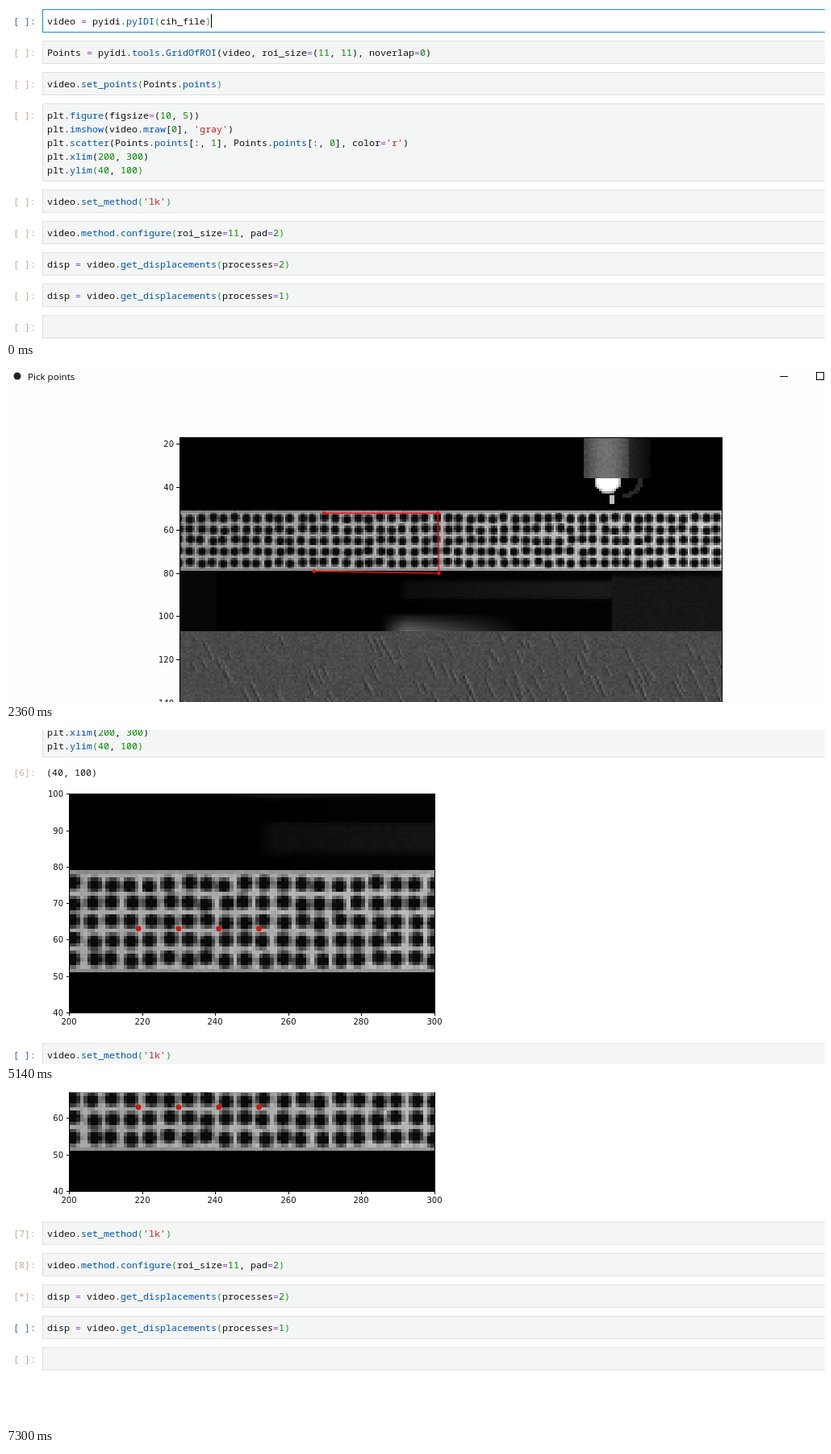
Recreate the animation shown at these times as an HTML page with a canvas. Size 1015x415 px, loop 8 s.

```html
<!DOCTYPE html>
<html lang="en">
<head>
<meta charset="utf-8">
<title>Notebook session</title>
<style>
  html, body { margin: 0; height: 100%; overflow: hidden; background: #fff; }
  canvas { display: block; }
</style>
</head>
<body>
<canvas id="stage" width="1015" height="415"></canvas>
<script>
const LOOP = 8000;
const ctx = document.getElementById('stage').getContext('2d');
const MONO = '11.667px "Noto Sans Mono", monospace';
const PLOT = '10px "DejaVu Sans", sans-serif';
const TITLE = '11.6px "Open Sans", sans-serif';
const CHAR = 7, LINE = 17;

// start: run begins and the next cell is selected; done: the number appears
const cells = [
  { code: ['video = pyidi.pyIDI(cih_file)'], start: 230, done: 230 },
  { code: ['Points = pyidi.tools.GridOfROI(video, roi_size=(11, 11), noverlap=0)'], start: 480, done: 3370 },
  { code: ['video.set_points(Points.points)'], start: 3520, done: 3600 },
  { code: ['plt.figure(figsize=(10, 5))',
           "plt.imshow(video.mraw[0], 'gray')",
           "plt.scatter(Points.points[:, 1], Points.points[:, 0], color='r')",
           'plt.xlim(200, 300)',
           'plt.ylim(40, 100)'], start: 4060, done: 4290 },
  { code: ["video.set_method('lk')"], start: 6760, done: 6760 },
  { code: ['video.method.configure(roi_size=11, pad=2)'], start: 7220, done: 7220 },
  { code: ['disp = video.get_displacements(processes=2)'], start: 7300, done: Infinity },
  { code: ['disp = video.get_displacements(processes=1)'], start: Infinity, done: Infinity },
  { code: [''], start: Infinity, done: Infinity },
];
const warning = [
  'C:\\ProgramData\\Anaconda3\\lib\\site-packages\\pyMRAW.py:103: UserWarning: Clipped footage! (Total frame: 2001, Original total frame: 50000)',
  "  warnings.warn('Clipped footage! (Total frame: {}, Original total frame: {})'.format(cih['Total Frame'], cih['Original Total Frame'] ))",
];
const picks = [[394.5, 180.5, 1490], [535, 180.5, 1890], [536.5, 255, 2210], [381.5, 252.5, 2360]];

const clamp = (v, lo = 0, hi = 1) => Math.min(hi, Math.max(lo, v));
const between = (v, lo, hi) => v >= lo && v < hi;
const easeInOut = p => p < .5 ? 4 * p ** 3 : 1 - 4 * (1 - p) ** 3;

// Eased progress that advances in visible ticks, as a screen recorder catches it.
function glide(t, start, tick, duration) {
  if (t < start) return 0;
  const elapsed = Math.floor((t - start) / tick + 1e-6) * tick + 70;
  return easeInOut(clamp(elapsed / duration));
}

function fill(color, x, y, w, h) {
  ctx.fillStyle = color;
  ctx.fillRect(x, y, w, h);
}
function text(str, x, y, color = '#111', font = MONO, align = 'left') {
  ctx.font = font;
  ctx.textAlign = align;
  ctx.fillStyle = color;
  ctx.fillText(str, x, y);
}
function dot(x, y, r, color) {
  ctx.fillStyle = color;
  ctx.beginPath();
  ctx.arc(x, y, r, 0, 7);
  ctx.fill();
}
function frame(color, x, y, w, h) {
  ctx.strokeStyle = color;
  ctx.lineWidth = 1;
  ctx.strokeRect(x + .5, y + .5, w - 1, h - 1);
}

// ---- camera picture: x 150..401, y 17..145 in sensor pixels ----
const X0 = 150, Y0 = 17, COLS = 251, ROWS = 128;
const hash = (a, b) => {
  const v = Math.sin(a * 12.9898 + b * 78.233) * 43758.5453;
  return v - Math.floor(v);
};

// Band of printed dots; neighbouring dots may nearly touch.
function speckle(x, y) {
  const col = Math.round((x - 201.5) / 5.18);
  const row = clamp(Math.round((y - 54.6) / 5.13), 0, 4);
  const dx = x - 201.5 - col * 5.18 - (hash(col, row) - .5) * 1.1;
  const dy = y - 54.6 - row * 5.13 - (hash(row + 9, col) - .5) * 1.1;
  const d = Math.hypot(dx, dy);
  const light = 146 + (x - X0) * .2 + hash(x, y) * 16;
  const edge = clamp(Math.min(y - 50.5, 79.5 - y) / 1.2);
  return (10 + (light - 10) * clamp((d - 1.3) / 1.5)) * edge;
}

function nozzle(x, y, n) {
  if (y < 36.5) {
    if (between(x, 337, 358)) return 58 + 48 * Math.sin((x - 337) / 21 * Math.PI) + n * 14;
    return between(x, 358, 368) ? 34 * (1 - (x - 358) / 12) + n * 6 : 1;
  }
  const tip = Math.hypot((x - 348) / 6.3, (y - 37.5) / 5.6);
  if (tip < 1) return 255 - 130 * clamp((tip - .75) * 4);
  if (between(y, 44, 48) && between(x, 349, 351)) return 190;
  const rim = Math.hypot((x - 354) / 9, (y - 37) / 7.5);
  return x > 355 && Math.abs(rim - 1) < .12 ? 42 : 1;
}

// Dim machinery between the band and the ground.
function shade(x, y, n) {
  if (x >= 350) return (19 + n * 6) * clamp((y - 79) / 4);
  const bar = (12 + 12 * clamp((x - 262) / 80) + n * 4)
    * clamp((x - 251) / 5) * clamp((y - 82) / 3) * clamp((93 - y) / 2);
  const glow = 115 * clamp((y - 98) / 9) * clamp((x - 243) / 12) * clamp((310 - x) / 60);
  return Math.max(bar, glow, x < 167 ? 6 : 3 * clamp((x - 256) / 30));
}

function gray(x, y) {
  const n = hash(x, y);
  if (y >= 107) return 62 + (n + hash(y, x)) * 12;
  if (y >= 79) return shade(x, y, n);
  return y >= 51 ? speckle(x, y) : nozzle(x, y, n);
}

function makePicture() {
  const canvas = document.createElement('canvas');
  canvas.width = COLS;
  canvas.height = ROWS;
  const g = canvas.getContext('2d');
  const data = g.createImageData(COLS, ROWS);
  for (let i = 0; i < COLS * ROWS; i++) {
    const v = gray(X0 + i % COLS + .5, Y0 + Math.floor(i / COLS) + .5);
    data.data.set([v, v, v, 255], i * 4);
  }
  g.putImageData(data, 0, 0);
  // slanted scratches on the ground
  for (let i = 0; i < 110; i++) {
    const x = hash(i, 1) * COLS, y = 91 + hash(i, 2) * 34, len = 3 + hash(i, 3) * 7;
    ['rgba(30,30,30,.45)', 'rgba(150,150,150,.3)'].forEach((color, side) => {
      g.strokeStyle = color;
      g.beginPath();
      g.moveTo(x + side, y);
      g.lineTo(x + side + len * .45, y + len);
      g.stroke();
    });
  }
  return canvas;
}
const picture = makePicture();

// ---- notebook ----
function drawCode(line, x, y, matchEnd) {
  const open = matchEnd ? line.lastIndexOf('(') : -1;
  for (const { 0: token, index } of line.matchAll(/'[^']*'|[A-Za-z_]\w*|\d+|\S/g)) {
    let color = '#111';
    if (token[0] === "'") color = '#ba2121';
    else if (/\d/.test(token[0])) color = '#080';
    else if (token === '=') color = '#8a3fd0';
    else if (/\w/.test(token[0]) && line[index - 1] === '.') color = '#05a';
    else if (open >= 0 && (index === open || index === line.length - 1)) color = '#1a9a1a';
    text(token, x + index * CHAR, y, color);
  }
}

function drawPlot(top) {
  const left = 78, scale = 4.53, w = 453, h = 272;
  ctx.save();
  ctx.translate(left, top + h);
  ctx.scale(1, -1);
  ctx.drawImage(picture, 200 - X0, 40 - Y0, 100, 60, 0, 0, w, h);
  ctx.restore();
  for (const x of [219, 230, 241, 252]) {
    dot(left + (x - 200) * scale, top + h - 23 * scale, 3.4, '#c81a10');
  }
  frame('#000', left, top, w + 1, h + 1);
  for (let v = 40; v <= 100; v += 10) {
    const y = Math.round(top + h - (v - 40) * scale);
    fill('#000', left - 3, y, 3, 1);
    text(v, left - 7, y + 4, '#111', PLOT, 'right');
  }
  for (let v = 200; v <= 300; v += 20) {
    const x = Math.round(left + (v - 200) * scale);
    fill('#000', x, top + h, 1, 4);
    text(v, x, top + h + 15, '#111', PLOT, 'center');
  }
}

function drawNotebook(t) {
  const active = cells.filter(c => c.start <= t).length;
  const scroll = 228 * (glide(t, 4760, 76, 450) + glide(t, 5770, 80, 600));
  let y = 4 - Math.round(scroll);
  cells.forEach(({ code, start, done }, i) => {
    const h = code.length * LINE + 12;
    const editing = i === active && (t < 230 || between(t, 6520, 6760));
    const mark = t >= done ? i + 3 : t >= start ? '*' : ' ';
    text(`[${mark}]:`, 9, y + 19, i === active ? '#38608c' : '#c0a890');
    fill(editing ? '#fff' : '#f4f5f5', 45, y, 990, h);
    frame(editing ? '#2088d8' : '#dfe0e0', 45, y, 990, h);
    code.forEach((line, k) =>
      drawCode(line, 51, y + 19 + k * LINE, i !== 1 && k === code.length - 1));
    if (editing && (t < 80 || t >= 6590)) {
      fill('#000', 51 + code[0].length * CHAR, y + 6, 1, 17);
    }
    y += h + 10;
    if (i === 0 && t >= start) {
      fill('#fddddc', 45, y - 5, 970, 39);
      warning.forEach((line, k) => text(line, 50, y + 13 + k * LINE));
      y += 44;
    }
    if (i === 3 && t >= 4140) {
      const plotted = t >= done;
      text(`[${mark}]:`, 9, y + 13, '#d0aca0');
      text('(40, 100)', 50, y + 13);
      if (plotted) drawPlot(y + 35);
      y += plotted ? 345 : 27;
    }
  });
}

// ---- point picking window ----
function drawPicker(t) {
  const rest = 1 - glide(t, 960, 77.5, 380);
  const scale = 2.68, left = 215, top = 86;
  ctx.save();
  ctx.translate(Math.round(161 * rest), Math.round(-10 * rest));
  ctx.shadowColor = 'rgba(0,0,0,.25)';
  ctx.shadowBlur = 14;
  fill('#fefefe', -3, -5, 1200, 600);
  ctx.shadowColor = 'transparent';
  fill('#777', -3, -5, 1, 600);

  dot(14, 10, 4.5, '#222');
  text('Pick points', 27, 15, '#000', TITLE);
  fill('#000', 959, 10, 10, 1);
  frame('#000', 1004, 5, 10, 10);

  ctx.drawImage(picture, left, top, COLS * scale, ROWS * scale);
  frame('#000', left, top, 673, 600);
  for (let v = 20; v <= 140; v += 20) {
    const y = Math.round(top + (v - Y0) * scale);
    fill('#000', left - 4, y, 4, 1);
    text(v, left - 7, y + 4, '#111', PLOT, 'right');
  }

  const shown = picks.filter(p => p[2] <= t);
  ctx.strokeStyle = '#f01010';
  ctx.lineWidth = 1.4;
  ctx.beginPath();
  shown.forEach(([x, y]) => ctx.lineTo(x, y));
  ctx.stroke();
  shown.forEach(([x, y]) => dot(x, y, 2.2, '#f01010'));
  ctx.restore();
}

function draw(now) {
  const t = now % LOOP;
  ctx.imageSmoothingEnabled = false;
  fill('#fff', 0, 0, 1015, 415);
  drawNotebook(t);
  if (between(t, 640, 3370)) drawPicker(t);
  requestAnimationFrame(draw);
}
requestAnimationFrame(draw);
</script>
</body>
</html>
```
